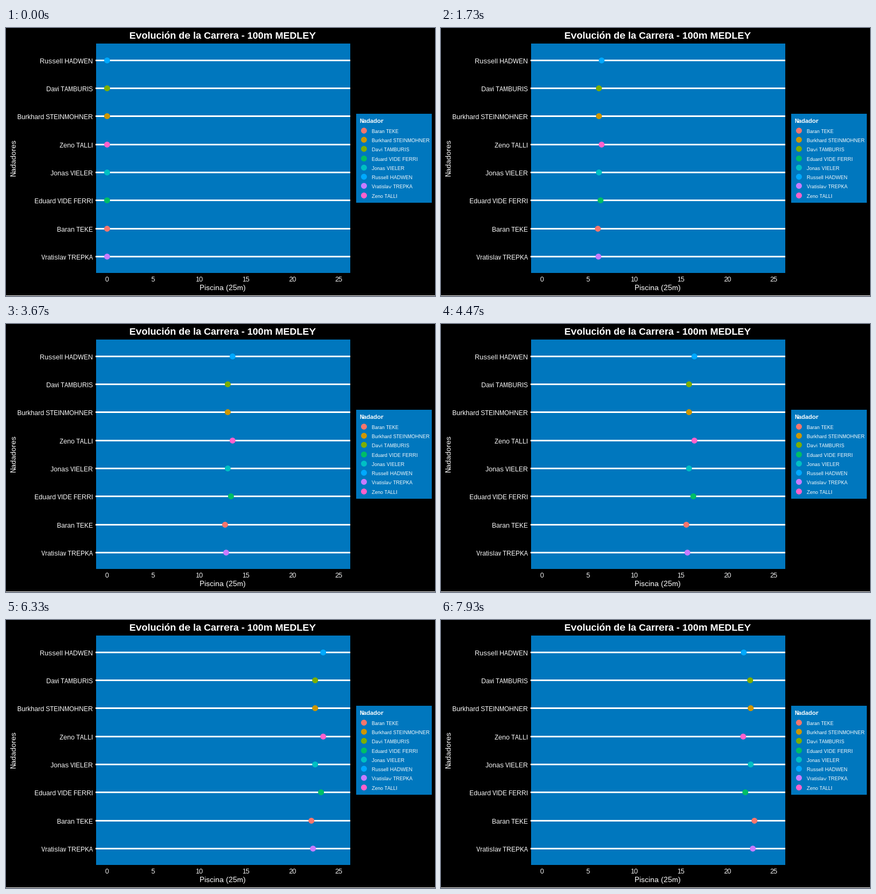
Recreate the animation shown at these times as a matplotlib script. Size 800 by 500 pixels, loop 8 s.

```python
import numpy as np
import matplotlib.pyplot as plt
from matplotlib.animation import FuncAnimation
from matplotlib.patches import Rectangle

W, H, DPI = 800, 500, 100
TICK, LOOP = 20, 8000
PX = 72 / DPI
POOL = "#0077be"
START, WALL = 188.3, 621.2
DOT = (11 * PX) ** 2

# name, colour, lane (top to bottom), speed out, speed back (px per step)
SWIMMERS = [
    ("Baran TEKE", "#F8766D", 6, 4.0035, 3.465),
    ("Burkhard STEINMOHNER", "#CD9600", 2, 4.079, 3.43),
    ("Davi TAMBURIS", "#7CAE00", 1, 4.079, 3.51),
    ("Eduard VIDE FERRI", "#00BE67", 5, 4.198, 3.41),
    ("Jonas VIELER", "#00BFC4", 4, 4.079, 3.43),
    ("Russell HADWEN", "#00A9FF", 0, 4.24, 3.385),
    ("Vratislav TREPKA", "#C77CFF", 7, 4.04, 3.39),
    ("Zeno TALLI", "#FF61CC", 3, 4.24, 3.44),
]
names, colors, lanes, out, back = zip(*SWIMMERS)
lane_y = np.floor(60.05 + 52.33 * np.array(lanes))
out, back = np.array(out), np.array(back)

plt.rcParams.update({
    "font.family": "Liberation Sans",
    "text.color": "white",
    "text.hinting": "native",
    "text.hinting_factor": 1,
})

fig = plt.figure(figsize=(W / DPI, H / DPI), dpi=DPI, facecolor="black")
ax = fig.add_axes([0, 0, 1, 1])
ax.set_xlim(0, W)
ax.set_ylim(H, 0)
ax.axis("off")


def box(x, y, w, h, color):
    ax.add_patch(Rectangle((x, y), w, h, fc=color, lw=0, antialiased=False))


def label(x, y, s, size, ha="left", **kw):
    ax.text(x, y, s, fontsize=size * PX, ha=ha, va="baseline", **kw)


def dots(x, y):
    return ax.scatter(x, y, s=DOT, c=colors, linewidths=0, zorder=3)


def positions(step):
    """Constant speed to the wall, then a slower constant speed back."""
    turn = (WALL - START) / out
    x = np.where(step < turn, START + out * step, WALL - back * (step - turn))
    return np.round(x)


# Pool, lanes and bottom edge
box(168, 29, 474, 428, POOL)
for name, y in zip(names, lane_y):
    box(167, y - 1, 475, 3, "white")
    label(162, y + 6, name, 12, "right")
box(0, H - 1, W, 1, "white")

# Titles and axis
label(404, 20, "Evolución de la Carrera - 100m MEDLEY", 18.25, "center",
      weight="bold")
label(404, 489, "Piscina (25m)", 14, "center")
label(18, 242, "Nadadores", 14.4, "center", rotation=90,
      rotation_mode="anchor")
for k in range(6):
    label(187.8 + 86.6 * k, 473, str(5 * k), 12.4, "center")

# Legend
box(653, 160, 141, 166, POOL)
label(659, 177, "Nadador", 11, weight="bold")
legend_y = np.floor(191.3 + 17.28 * np.arange(len(names)))
dots(np.full(len(names), 667.5), legend_y + 0.5)
for name, y in zip(names, legend_y):
    label(682, y + 5, name, 9)

racers = dots(positions(0) + 0.5, lane_y + 0.5)


def draw(i):
    # 15 steps per second, held on 20 ms ticks
    step = (3 * i + 2) // 10
    racers.set_offsets(np.column_stack([positions(step) + 0.5, lane_y + 0.5]))
    return [racers]


anim = FuncAnimation(fig, draw, frames=LOOP // TICK, interval=TICK,
                     repeat=True, repeat_delay=0)
plt.show()
```
